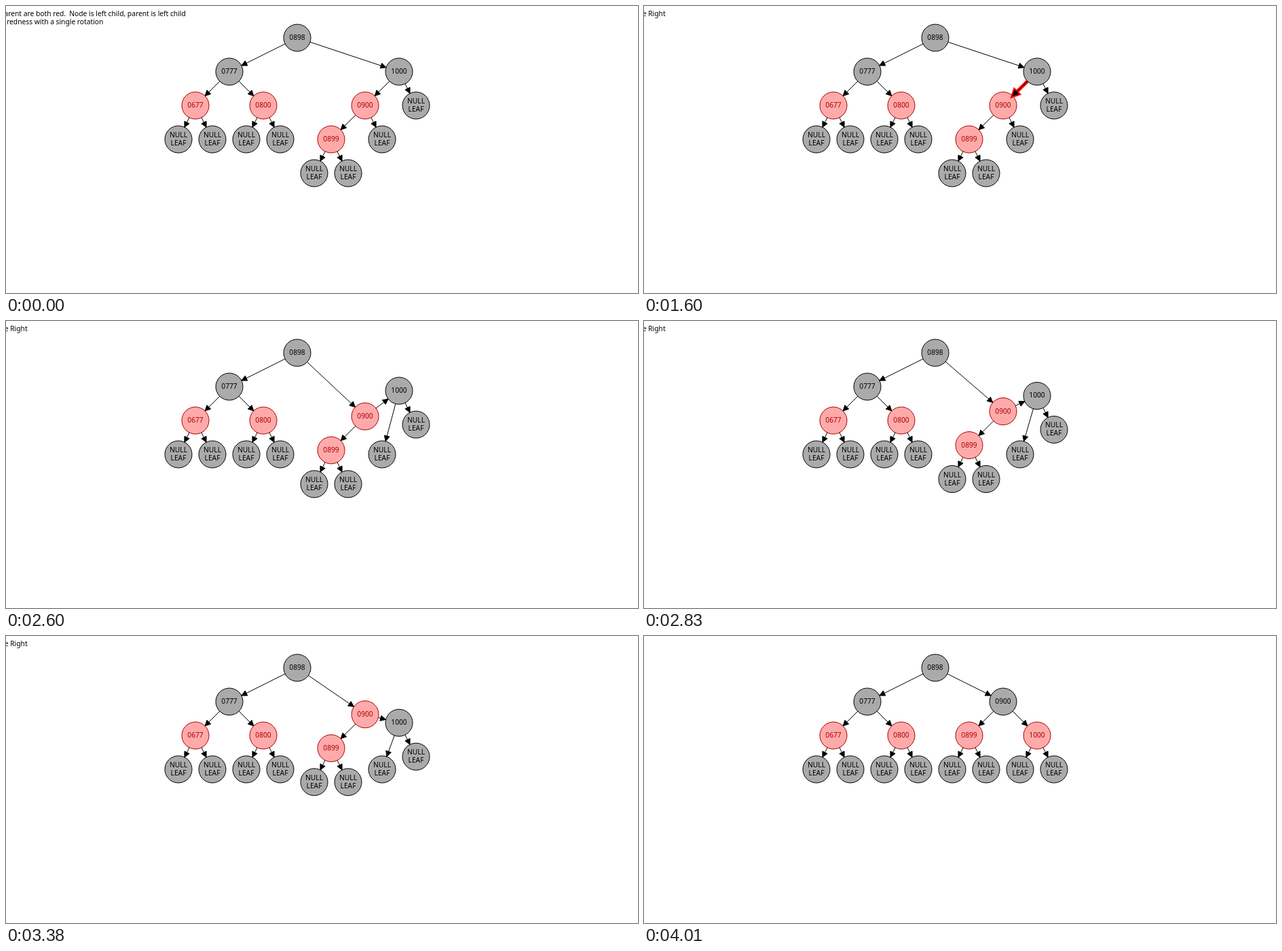
Write an HTML page with a canvas that moves like this. It is 931 by 424 pixels and loops after 5320 ms.

```html
<!DOCTYPE html>
<html lang="en">
<head>
<meta charset="utf-8">
<title>Tree rotation</title>
<style>
html, body { margin: 0; width: 100%; height: 100%; overflow: hidden; background: #fff; }
canvas { display: block; }
</style>
</head>
<body>
<canvas id="stage" width="931" height="424"></canvas>
<script>
const ctx = document.getElementById('stage').getContext('2d');
const LOOP = 5320, LIT = 990, SWAP = 2370, DONE = 4010;
const RADIUS = 20;

// Stretches of motion: first step, last step, number of steps
const RUNS = [
  [990, 1450, 7], [1530, 1990, 7], [2140, 2600, 7],
  [2680, 3150, 7], [3230, 3700, 7], [3780, 4010, 4]
];

// label, x, y before, y after, red before, red after
const NODES = {
  root: ['0898', 429, 47, 47, 0, 0],
  a: ['0777', 329, 97, 97, 0, 0],
  b: ['0677', 279, 147, 147, 1, 1],
  c: ['0800', 379, 147, 147, 1, 1],
  d: ['1000', 579, 97, 147, 0, 1],
  e: ['0900', 529, 147, 97, 1, 0],
  f: ['0899', 479, 197, 147, 1, 1],
  b1: ['', 254, 197, 197, 0, 0],
  b2: ['', 304, 197, 197, 0, 0],
  c1: ['', 354, 197, 197, 0, 0],
  c2: ['', 404, 197, 197, 0, 0],
  f1: ['', 454, 247, 197, 0, 0],
  f2: ['', 504, 247, 197, 0, 0],
  e2: ['', 554, 197, 197, 0, 0],
  d2: ['', 604, 147, 197, 0, 0]
};
const pairs = s => s.split(' ').map(p => p.split('-'));
const FIXED = pairs('root-a a-b a-c b-b1 b-b2 c-c1 c-c2 e-f f-f1 f-f2 d-d2');
const BEFORE = pairs('root-d d-e e-e2');
const AFTER = pairs('root-e e-d d-e2');

// Latest step time at or before t
function held(t) {
  let last = 0;
  for (const [from, to, count] of RUNS) {
    for (let i = 0; i < count; i++) {
      const at = Math.floor((from + (to - from) * i / (count - 1)) / 10) * 10;
      if (at <= t) last = at;
    }
  }
  return last;
}

// Triangle wave between 3 and 7
function pulse(t) {
  const m = (((t - 2025) / 210) % 8 + 8) % 8;
  return 3 + Math.abs(m - 4);
}

function text(str, x, y, color, align) {
  ctx.fillStyle = color;
  ctx.textAlign = align;
  ctx.fillText(str, x, y + 3);
}

function drawNode(n) {
  const ink = n.red ? '#aa0000' : '#000';
  ctx.beginPath();
  ctx.arc(n.x, n.y, RADIUS, 0, Math.PI * 2);
  ctx.fillStyle = n.red ? '#ffaaaa' : '#aaaaaa';
  ctx.strokeStyle = ink;
  ctx.lineWidth = 1;
  ctx.fill();
  ctx.stroke();
  if (n.label) {
    text(n.label, n.x, n.y, ink, 'center');
  } else {
    text('NULL', n.x, n.y - 6, ink, 'center');
    text('LEAF', n.x, n.y + 6, ink, 'center');
  }
}

function drawArrow(p, q, width, color) {
  const len = Math.hypot(p.x - q.x, p.y - q.y);
  const ux = (p.x - q.x) / len, uy = (p.y - q.y) / len;
  const x = q.x + ux * RADIUS, y = q.y + uy * RADIUS;
  ctx.strokeStyle = ctx.fillStyle = color;
  ctx.lineWidth = width;
  ctx.beginPath();
  ctx.moveTo(p.x - ux * RADIUS, p.y - uy * RADIUS);
  ctx.lineTo(x, y);
  ctx.stroke();
  ctx.beginPath();
  ctx.moveTo(x, y);
  ctx.lineTo(x + ux * 8 - uy * 4, y + uy * 8 + ux * 4);
  ctx.lineTo(x + ux * 8 + uy * 4, y + uy * 8 - ux * 4);
  ctx.closePath();
  ctx.stroke();
  ctx.fill();
}

function drawCaption(t) {
  if (t < LIT) {
    text('Node and parent are both red.\u00a0 Node is left child, parent is left child', 264.8, 12, '#000', 'right');
    text('Can fix extra redness with a single rotation', 143.4, 24, '#000', 'right');
  } else if (t < DONE) {
    text('Single Rotate Right', 31.6, 12, '#000', 'right');
  }
}

function draw(t) {
  const done = t >= DONE;
  const move = done ? 1 : Math.min(1, Math.max(0, (t - 2412) / 1550));
  const nodes = {};
  ctx.fillStyle = '#fff';
  ctx.fillRect(0, 0, 931, 424);
  ctx.font = '10.25px "Noto Sans", "Open Sans", sans-serif';
  drawCaption(t);
  for (const id in NODES) {
    const [label, x, y0, y1, red0, red1] = NODES[id];
    nodes[id] = { label, x, y: y0 + (y1 - y0) * move, red: done ? red1 : red0 };
    drawNode(nodes[id]);
  }
  if (t >= LIT && t < SWAP) drawArrow(nodes.d, nodes.e, pulse(t), '#ff0000');
  for (const [p, q] of FIXED.concat(t < SWAP ? BEFORE : AFTER)) {
    drawArrow(nodes[p], nodes[q], 1, '#000');
  }
}

const start = performance.now();
function tick() {
  draw(held((performance.now() - start) % LOOP));
  requestAnimationFrame(tick);
}
tick();
</script>
</body>
</html>
```
